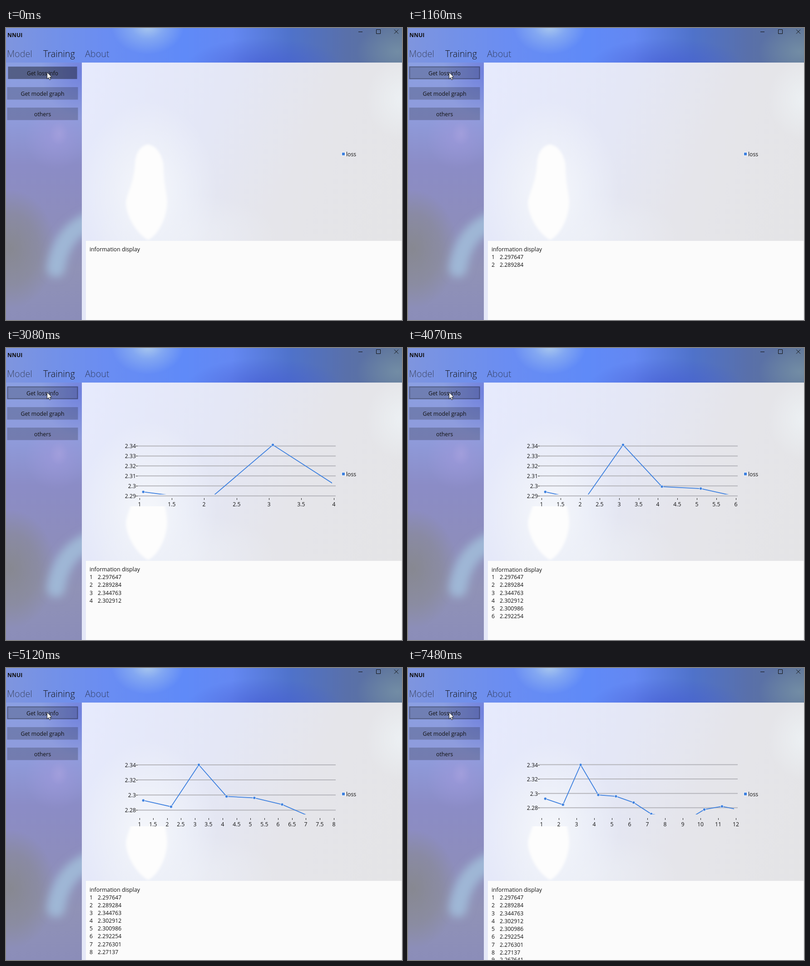
Write an HTML page that moves like this. It is 872 px wide and 642 px high and loops after 8 s.

```html
<!DOCTYPE html>
<html lang="en">
<head>
<meta charset="utf-8">
<title>Training loss</title>
<style>
html, body { margin: 0; width: 100%; height: 100%; overflow: hidden; background: #e5e6ee; }
div, svg { position: absolute; left: 0; top: 0; }
#header {
  width: 872px; height: 76px;
  background:
    radial-gradient(80px 62px at 312px -4px, #abc9ee, #94b7f0a0 45%, #94b7f000),
    radial-gradient(90px 60px at 862px 52px, #7b97aab0, #7b97aa00),
    radial-gradient(170px 60px at 570px 82px, #4358d0a0, #4358d000),
    linear-gradient(90deg, #7f95de, #7391e8 12%, #6a8df2 25%, #5f8af8 45%, #6488f2 57%, #4f72ca 72%, #5970aa 86%, #5f7598);
}
#side {
  top: 76px; width: 167px; height: 566px;
  background:
    radial-gradient(20px 26px at 117px 156px, #a9a3de90, #a9a3de00),
    radial-gradient(70px 70px at 110px 165px, #a099dca0, #a099dc00),
    radial-gradient(100px 130px at 10px 410px, #878891, #87889190 60%, #87889100),
    radial-gradient(90px 100px at 167px 20px, #6878dcc0, #6878dc00),
    linear-gradient(#8b9fe2, #8f9bdb 22%, #8b8cc6 40%, #8d8dbd 60%, #9092b6 80%, #8b8db9);
}
#main {
  left: 167px; top: 76px; width: 705px; height: 566px;
  background:
    radial-gradient(150px 200px at 146px 285px, #f5f7fb, #eff2f9c0 50%, #eef1f900),
    radial-gradient(200px 90px at 230px 380px, #edf0f6c0, #edf0f600),
    radial-gradient(80px 90px at 705px 80px, #ecf0f3, #ecf0f300),
    linear-gradient(115deg, #e6eafd, #e4e7f6 35%, #e5e5ea 60%, #e4e4e5);
}
text { font-family: "Open Sans", "Noto Sans", sans-serif; font-size: 12.25px; fill: #111; }
.tab { font-size: 19.8px; font-weight: 300; }
.mid { text-anchor: middle; }
.end { text-anchor: end; }
</style>
</head>
<body>
<div id="header"></div>
<div id="side"></div>
<div id="main"></div>
<svg width="872" height="642" viewBox="0 0 872 642">
  <defs>
    <filter id="soft" x="-20%" y="-20%" width="140%" height="140%"><feGaussianBlur stdDeviation="2.5"/></filter>
    <filter id="haze" x="-50%" y="-50%" width="200%" height="200%"><feGaussianBlur stdDeviation="9"/></filter>
    <clipPath id="sideClip"><rect y="76" width="167" height="566"/></clipPath>
    <clipPath id="plotClip"><rect x="290" y="200" width="428" height="122"/></clipPath>
    <clipPath id="glowClip"><rect id="glowArea" x="167" y="240" width="300" height="240"/></clipPath>
  </defs>

  <g clip-path="url(#sideClip)">
    <path d="M185 425 Q122 450 110 528" fill="none" stroke="#9fb7d6" stroke-width="40" stroke-linecap="round" filter="url(#haze)"/>
  </g>
  <g clip-path="url(#glowClip)">
    <path d="M313 256C335 260 346 285 347 305C347 345 355 365 355 385C353 420 335 455 313 466C292 455 266 420 264 385C266 362 281 345 284 300C285 275 296 258 313 256Z" fill="#fdfdfd" filter="url(#soft)"/>
  </g>
  <rect x="176" y="468" width="695" height="174" fill="#fbfbfb"/>

  <text x="3" y="19.5" font-weight="700">NNUI</text>
  <text class="tab" x="2" y="64" opacity=".6">Model</text>
  <text class="tab" x="82" y="64">Training</text>
  <text class="tab" x="174" y="64" opacity=".6">About</text>
  <path d="M776 8.5h9M815.5 3.5h9v9h-9zM855 3.5l9 9m0-9l-9 9" fill="none" stroke="#111"/>

  <g id="lossButton">
    <rect id="lossFill" x="2.5" y="84.5" width="156" height="28"/>
    <rect id="lossEdge" x="3.5" y="85.5" width="154" height="26" fill="none" stroke="#000" stroke-width="2"/>
    <text class="mid" x="80.5" y="104">Get loss info</text>
  </g>
  <path d="M2.5 130h156v27.5h-156zM2.5 175h156v27.5h-156z" fill-opacity=".2"/>
  <text class="mid" x="80.5" y="149">Get model graph</text>
  <text class="mid" x="80.5" y="194">others</text>

  <rect x="739" y="273" width="8" height="8" fill="#f6f8fc"/>
  <rect x="740" y="274" width="6" height="6" fill="#3d80df"/>
  <text x="749" y="282">loss</text>
  <g id="chart"></g>
  <g id="log"></g>
  <path d="M90.5 97.5v14.5l3.3-3.1 2.3 5.2 2.4-1.1-2.3-5h4.6z" fill="#fff" stroke="#111" stroke-width=".9"/>
</svg>
<script>
const LOOP = 8000;
const losses = [2.297647, 2.289284, 2.344763, 2.302912, 2.300986, 2.292254,
  2.276301, 2.27137, 2.267641, 2.28254, 2.28698, 2.282];
const logTimes = [1160, 2400, 3390, 4440, 5430, 6490, 7480];
const chartTimes = [2340, 3080, 4070, 5120, 6120, 7170];
const plot = { left: 294, width: 428, top: 205, height: 121.7, shift: 8.3 };

const byId = id => document.getElementById(id);
const countPast = (times, t) => times.filter(start => t >= start).length;
const label = (x, y, text, cls = '') => `<text class="${cls}" x="${x}" y="${y}">${text}</text>`;
const line = (x1, y1, x2, y2, stroke, width = 1) =>
  `<line x1="${x1}" y1="${y1}" x2="${x2}" y2="${y2}" stroke="${stroke}" stroke-width="${width}"/>`;

// Smallest 1-2-5 step that gives at most the given number of intervals.
function niceStep(range, maxIntervals) {
  const ideal = range / maxIntervals;
  const unit = 10 ** Math.floor(Math.log10(ideal));
  return unit * [1, 2, 5, 10].find(m => m * unit >= ideal - 1e-9);
}

function ticks(min, max, maxIntervals) {
  const step = niceStep(max - min, maxIntervals);
  const list = [];
  for (let i = Math.ceil(min / step - 1e-6); i * step <= max + 1e-6; i++) list.push(i * step);
  return list;
}

function chartMarkup(count) {
  if (!count) return '';
  const values = losses.slice(0, count);
  const min = Math.min(...values), max = Math.max(...values);
  const xAt = n => plot.left + (n - 1) / (count - 1) * plot.width;
  const yAt = v => plot.top + (max - v) / (max - min) * plot.height;
  let out = '';
  for (const v of ticks(min, max, 6)) {
    const y = yAt(v);
    out += line(290, y, 726, y, '#b6b6bc', 2) + line(286, Math.round(y) + .5, 290, Math.round(y) + .5, '#222')
      + label(286, Math.round(y) + 5, +v.toFixed(2), 'end');
  }
  for (const n of ticks(1, count, 14)) {
    const x = Math.floor(xAt(n)) + .5;
    out += line(x, 330, x, 334, '#222') + label(x - .5, 348, +n.toFixed(1), 'mid');
  }
  const points = values.map((v, i) => [xAt(i + 1) + plot.shift, yAt(v) + plot.shift - .3]);
  const dots = points.map(([x, y]) =>
    `<circle cx="${x}" cy="${y}" r="3.2" fill="#3d80df" stroke="#eef2fa"/>`).join('');
  return out + `<g clip-path="url(#plotClip)"><polyline points="${points.join(' ')}" fill="none"
    stroke="#3d80df" stroke-width="1.8"/>${dots}</g>`;
}

// Each pair of rows settles one pixel lower, three updates after the pair above it appears.
function logMarkup(updates) {
  const baseline = row => Math.ceil(485.5 + 17.25 * row) + 5 + (updates >= Math.ceil(row / 2) + 3 ? 1 : 0);
  let out = label(184, baseline(0), 'information display');
  for (let row = 1; row <= Math.min(updates * 2, 9); row++) {
    out += label(184, baseline(row), row) + label(202, baseline(row), losses[row - 1]);
  }
  return out;
}

function drawButton(t) {
  const step = t < 60 ? 0 : Math.min(6, Math.floor((t - 60) / 70) + 1);
  const release = 1 - (1 - step / 6) ** 2;
  const scale = .975 + .025 * release;
  byId('lossButton').setAttribute('transform', `translate(80.5 98.5) scale(${scale}) translate(-80.5 -98.5)`);
  byId('lossFill').setAttribute('fill-opacity', .4 - .2 * release);
  byId('lossEdge').setAttribute('stroke-opacity', .28 * release);
}

let drawn = '';
function render(t) {
  drawButton(t);
  const charts = countPast(chartTimes, t), updates = countPast(logTimes, t);
  const key = charts + '/' + updates;
  if (key === drawn) return;
  drawn = key;
  byId('chart').innerHTML = chartMarkup(charts * 2);
  byId('log').innerHTML = logMarkup(updates);
  byId('glowArea').setAttribute('y', charts ? 348 : 240);
}

const start = performance.now();
function tick(now) {
  render(Math.max(0, now - start) % LOOP);
  requestAnimationFrame(tick);
}
render(0);
requestAnimationFrame(tick);
</script>
</body>
</html>
```
